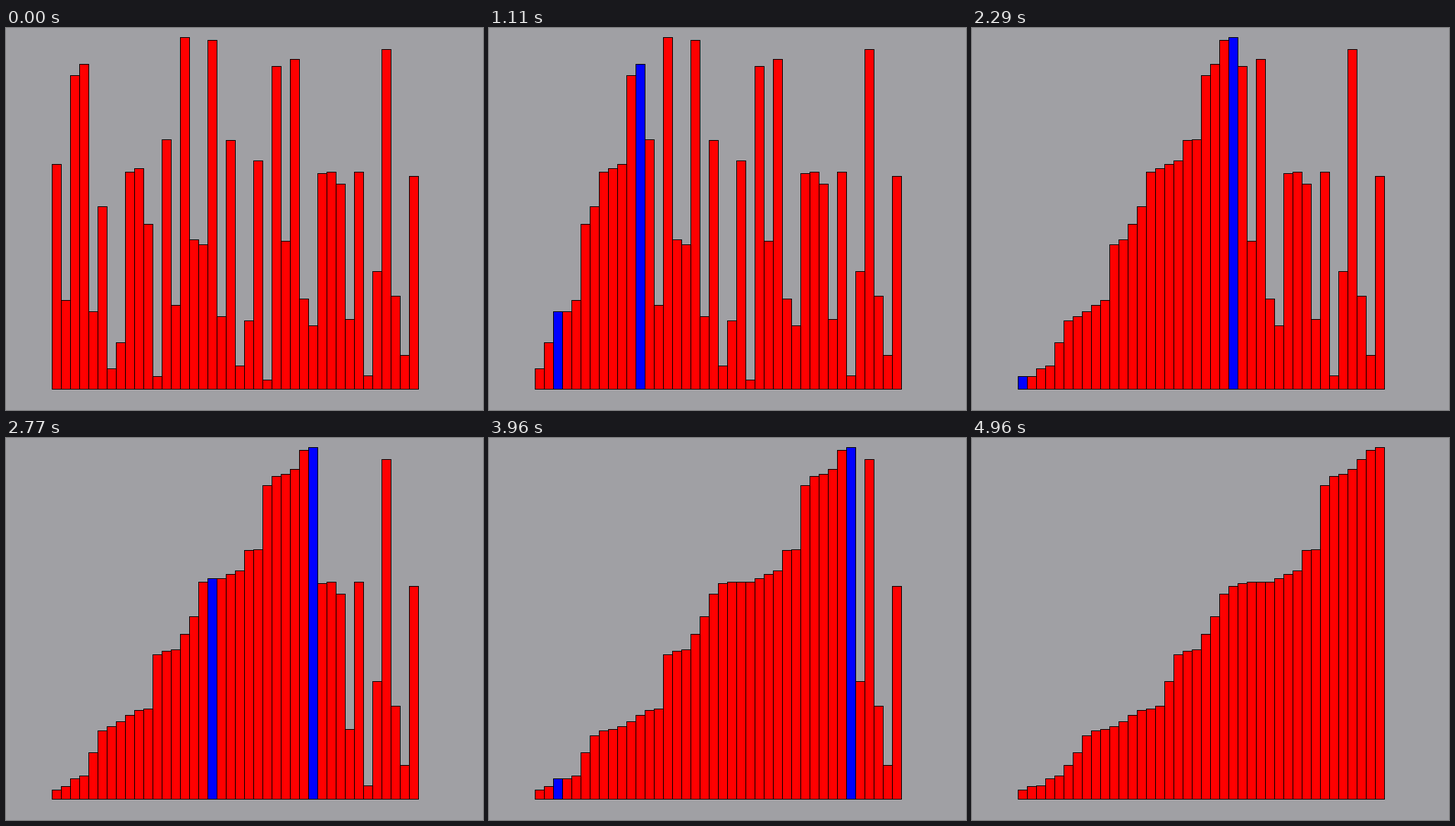
Animation, 677 px wide and 542 px high, one loop 5740 ms. Source, as a matplotlib script:

```python
import matplotlib.pyplot as plt
from matplotlib.animation import FuncAnimation
from matplotlib.collections import PolyCollection

WIDTH, HEIGHT, DPI = 677, 542, 64
LOOP_MS, TICK_MS = 5740, 10
START_MS, REFRESH_MS = 722, 47.5
FIRST_SHIFT, SHIFTS_PER_REFRESH = 3, 4.695
LEFT, BASE, BAR = 65, 512, 13
GRAY, RED, BLUE = "#a0a0a4", "#ff0000", "#0000ff"

# The unsorted input
VALUES = [319, 126, 445, 461, 110, 259, 29, 66, 308, 313,
          234, 18, 354, 119, 499, 212, 205, 495, 103, 353,
          33, 97, 324, 13, 458, 210, 468, 128, 90, 306,
          308, 291, 99, 308, 19, 167, 482, 132, 48, 302]


def insertion_sort_states(values):
    """Every state after a shift: (bar heights, highlighted indices)."""
    bars = list(values)
    states = [(tuple(bars), ())]
    for i in range(1, len(bars)):
        key, j = bars[i], i - 1
        while j >= 0 and bars[j] > key:
            bars[j + 1] = bars[j]
            states.append((tuple(bars), (j, i)))
            j -= 1
        bars[j + 1] = key
    states.append((tuple(bars), ()))
    return states


STATES = insertion_sort_states(VALUES)


def state_at(ms):
    """The screen refreshes at a steady rate, several shifts at a time."""
    if ms < START_MS:
        return STATES[0]
    refresh = int((ms - START_MS) / REFRESH_MS)
    shift = round(FIRST_SHIFT + SHIFTS_PER_REFRESH * refresh)
    return STATES[min(shift, len(STATES) - 1)]


def box(x0, y0, x1, y1):
    return [(x0, y0), (x1, y0), (x1, y1), (x0, y1)]


fig = plt.figure(figsize=(WIDTH / DPI, HEIGHT / DPI), dpi=DPI, facecolor=GRAY)
ax = fig.add_axes([0, 0, 1, 1])
ax.set_xlim(0, WIDTH)
ax.set_ylim(HEIGHT, 0)
ax.axis("off")

outlines = PolyCollection([], facecolors="black", linewidths=0, antialiaseds=False)
fills = PolyCollection([], linewidths=0, antialiaseds=False)
for layer in (outlines, fills):
    ax.add_collection(layer, autolim=False)


def draw(frame):
    bars, marked = state_at(frame * TICK_MS)
    corners = [(LEFT + BAR * k, BASE - h) for k, h in enumerate(bars)]
    outlines.set_verts([box(x, y, x + BAR + 1, BASE + 1) for x, y in corners])
    fills.set_verts([box(x + 1, y + 1, x + BAR, BASE) for x, y in corners])
    fills.set_facecolor([BLUE if k in marked else RED for k in range(len(bars))])
    return outlines, fills


animation = FuncAnimation(fig, draw, frames=LOOP_MS // TICK_MS, interval=TICK_MS,
                          init_func=lambda: draw(0), repeat=True, repeat_delay=0)
plt.show()
```
